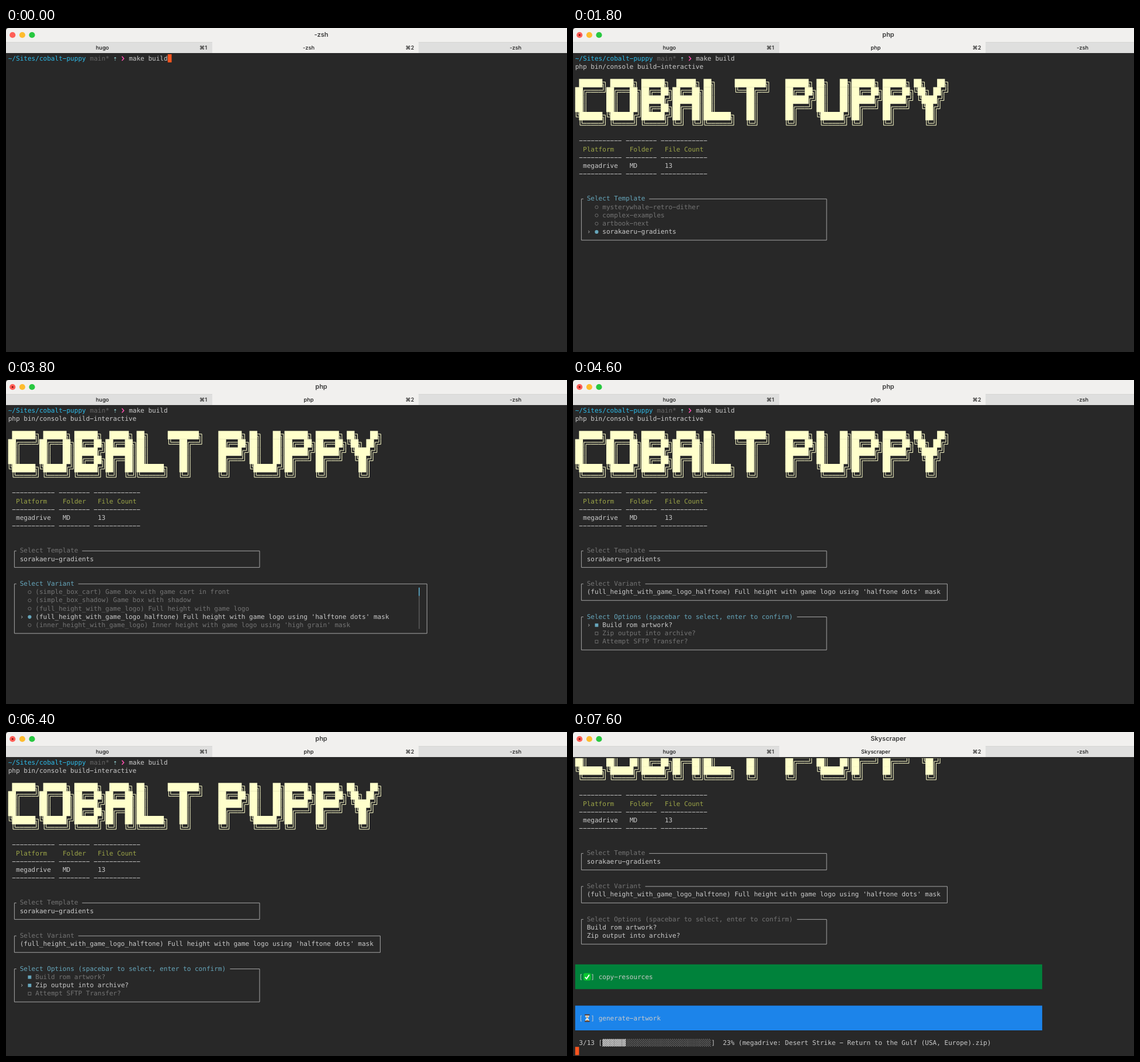
An HTML page for the animation above (8000 ms loop, 960 px wide and 556 px high).

```html
<!DOCTYPE html>
<html lang="en">
<head>
<meta charset="utf-8">
<title>Terminal session</title>
<style>
  html, body { margin: 0; width: 100%; height: 100%; overflow: hidden; background: #282828; }
  svg { display: block; width: 100%; height: 100%; }
  text { white-space: pre; text-rendering: geometricPrecision; }
  .mono { font: 11.062px "DejaVu Sans Mono", "DejaVu Sans", monospace; }
  .title { font: 600 11px Inter, sans-serif; fill: #3c3c3c; text-anchor: middle; }
  .tab { font: 500 9.2px Inter, "DejaVu Sans", sans-serif; fill: #161616; text-anchor: middle; }
</style>
</head>
<body>
<svg viewBox="0 0 960 556" xmlns="http://www.w3.org/2000/svg">
  <rect width="960" height="556" fill="#282828"/>
  <g id="screen"></g>
  <g id="chrome"></g>
</svg>
<script>
const LOOP = 8000, STEP = 200;
const CELL_W = 6.66, CELL_H = 14.155, LEFT = 3.7, TOP = 44.9;
const INK = '#c9c9c9', DIM = '#747474', LINE = '#a6a6a6', ACCENT = '#66a6bb',
      OLIVE = '#9ca548', CREAM = '#ffffcb', CURSOR = '#f9551f';

const TEMPLATES = ['mysterywhale-retro-dither', 'complex-examples', 'artbook-next', 'sorakaeru-gradients'];
const VARIANTS = [
  '(simple_box_cart) Game box with game cart in front',
  '(simple_box_shadow) Game box with shadow',
  '(full_height_with_game_logo) Full height with game logo',
  "(full_height_with_game_logo_halftone) Full height with game logo using 'halftone dots' mask",
  "(inner_height_with_game_logo) Inner height with game logo using 'high grain' mask"
];
const OPTIONS = ['Build rom artwork?', 'Zip output into archive?', 'Attempt SFTP Transfer?'];
const OPTIONS_TITLE = 'Select Options (spacebar to select, enter to confirm)';

const GLYPHS = {
  C: ' ██████╗/██╔════╝/██║     /██║     /╚██████╗/ ╚═════╝',
  O: ' ██████╗ /██╔═══██╗/██║   ██║/██║   ██║/╚██████╔╝/ ╚═════╝ ',
  B: '██████╗ /██╔══██╗/██████╔╝/██╔══██╗/██████╔╝/╚═════╝ ',
  A: ' █████╗ /██╔══██╗/███████║/██╔══██║/██║  ██║/╚═╝  ╚═╝',
  L: '██╗     /██║     /██║     /██║     /███████╗/╚══════╝',
  T: '████████╗/╚══██╔══╝/   ██║   /   ██║   /   ██║   /   ╚═╝   ',
  P: '██████╗ /██╔══██╗/██████╔╝/██╔═══╝ /██║     /╚═╝     ',
  U: '██╗   ██╗/██║   ██║/██║   ██║/██║   ██║/╚██████╔╝/ ╚═════╝ ',
  Y: '██╗   ██╗/╚██╗ ██╔╝/ ╚████╔╝ /  ╚██╔╝  /   ██║   /   ╚═╝   ',
  ' ': '    /    /    /    /    /    '
};
// Arm directions of the double-line corners: horizontal, vertical
const CORNERS = { '╔': [1, 1], '╗': [-1, 1], '╚': [1, -1], '╝': [-1, -1] };

const colX = col => LEFT + col * CELL_W;
const rowY = row => TOP + row * CELL_H;
const midX = col => colX(col + .5) + .7;
const midY = row => rowY(row + .5) + .7;

const rect = (x, y, w, h, fill, extra = '') =>
  `<rect x="${x}" y="${y}" width="${w}" height="${h}" fill="${fill}" ${extra}/>`;
const stroke = (d, color = LINE, width = 1) =>
  `<path d="${d}" fill="none" stroke="${color}" stroke-width="${width}"/>`;
const circle = (x, y, r, fill, extra = '') =>
  `<circle cx="${x}" cy="${y}" r="${r}" fill="${fill}" ${extra}/>`;
const label = (cls, x, y, str) => `<text class="${cls}" x="${x}" y="${y}">${str}</text>`;
// The wide minus gives the long hyphens of the terminal font
const text = (col, row, str, fill = INK) =>
  `<text class="mono" x="${colX(col)}" y="${rowY(row) + 10.9}" fill="${fill}">${str.replace(/-/g, '−')}</text>`;
const cursor = (col, row) => rect(colX(col), rowY(row), CELL_W, CELL_H, CURSOR);

function banner(word, firstRow) {
  const gap = 1.7;
  let lines = '', blocks = '';
  for (let r = 0; r < 6; r++) {
    const row = firstRow + r, y0 = rowY(row), y1 = rowY(row + 1), cy = (y0 + y1) / 2;
    const chars = [...word].map(ch => GLYPHS[ch].split('/')[r]).join('');
    for (const run of chars.matchAll(/█+/g))
      blocks += rect(colX(run.index), y0, run[0].length * CELL_W, CELL_H + .3, CREAM);
    [...chars].forEach((ch, col) => {
      const x0 = colX(col), x1 = colX(col + 1), cx = (x0 + x1) / 2;
      for (const d of [-gap, gap]) {
        if (ch === '═') lines += `M${x0} ${cy + d}H${x1}`;
        if (ch === '║') lines += `M${cx + d} ${y0}V${y1}`;
        if (CORNERS[ch]) {
          const [sx, sy] = CORNERS[ch];
          lines += `M${sx > 0 ? x1 : x0} ${cy + sy * d}H${cx + sx * d}V${sy > 0 ? y1 : y0}`;
        }
      }
    });
  }
  return stroke(lines, CREAM) + blocks;
}
const BANNER = banner('COBALT PUPPY', 3);

function table(row) {
  const rule = '----------- -------- ------------';
  const cells = (r, names, fill) => names.map((name, i) => text([2, 14, 23][i], r, name, fill)).join('');
  return [0, 2, 4].map(r => text(1, row + r, rule)).join('') +
    cells(row + 1, ['Platform', 'Folder', 'File Count'], OLIVE) +
    cells(row + 3, ['megadrive', 'MD', '13'], INK);
}

function box(row, title, innerRows, lastCol, active) {
  const x0 = midX(1), x1 = midX(lastCol), y0 = midY(row), y1 = midY(row + innerRows + 1);
  return text(3, row, title, active ? ACCENT : DIM) +
    stroke(`M${colX(2) + .7} ${y0}H${x0}V${y1}H${x1}V${y0}H${colX(title.length + 4)}`);
}

function answered(row, title, values, lastCol) {
  return box(row, title, values.length, lastCol, false) +
    values.map((value, i) => text(3, row + 1 + i, value)).join('');
}

function radio(row, on) {
  return on ? circle(midX(5) - .6, midY(row), 3.1, ACCENT)
            : circle(midX(5) - .6, midY(row), 2.6, 'none', `stroke="${DIM}" stroke-width=".9"`);
}

function checkbox(row, on) {
  const x = midX(5) - 3.5, y = midY(row) - 2.9;
  return on ? rect(x, y, 5.8, 5.8, ACCENT)
            : rect(x + .5, y + .5, 4.8, 4.8, 'none', `stroke="${DIM}" stroke-width=".9"`);
}

function menu(row, title, items, lastCol, focus, mark) {
  return box(row, title, items.length, lastCol, true) + items.map((item, i) => {
    const r = row + 1 + i, focused = i === focus;
    return (focused ? text(3, r, '›', LINE) : '') + mark(r, i) + text(7, r, item, focused ? INK : DIM);
  }).join('');
}

function task(row, name, color, icon) {
  return rect(colX(0), rowY(row), 120 * CELL_W, 3 * CELL_H, color) +
    text(1, row + 1, '[') + text(4, row + 1, '] ' + name) +
    `<g transform="translate(${colX(2) + 1} ${rowY(row + 1) + .9})">${icon}</g>`;
}
const CHECK_ICON = rect(0, 0, 12.6, 12.6, '#0ac630', 'rx="2.6"') +
  stroke('M2.7 6.8L5.2 9.7L9.8 2.8', '#fff', 1.9);
const GLASS_ICON =
  '<path d="M2.8 1.5H9.8Q9.8 5 7 6.5Q9.8 8 9.8 11.5H2.8Q2.8 8 5.6 6.5Q2.8 5 2.8 1.5Z" fill="#dbe6ee"/>' +
  '<path d="M4 4H8.6L6.3 6.5ZM3.6 11.2Q6.3 7.5 9 11.2Z" fill="#c08a3c"/>' +
  rect(1.8, 0, 9, 2, '#5b3a29', 'rx=".8"') + rect(1.8, 11, 9, 2, '#5b3a29', 'rx=".8"');

function progress(row, done, file) {
  const filled = Math.floor(done / 13 * 28);
  const percent = String(Math.round(done / 13 * 100)).padStart(3);
  return text(1, row, `${done}/13 [${'▓'.repeat(filled)}${'░'.repeat(28 - filled)}] ${percent}% (${file})`);
}

// How many of the given moments have passed
const passed = (t, ...times) => times.filter(time => t >= time).length;

function screen(t) {
  let out = text(0, 0, '~/Sites/cobalt-puppy', '#2dbbe9') + text(21, 0, 'main*', '#666') +
    text(27, 0, '⇡', '#a5eef0') + stroke('M198.4 48.7L201.6 52.4L198.4 56.1', '#fb4fae', 1.6) +
    text(31, 0, 'make build');
  if (t < 200) return out + cursor(41, 0);
  out += text(0, 1, 'php bin/console build-interactive');
  if (t < 600) return out + cursor(0, 2);

  out += BANNER + table(10);
  if (t < 2200) {
    const focus = passed(t, 1000, 1200, 1400);
    return out + menu(17, 'Select Template', TEMPLATES, 64, focus, (r, i) => radio(r, i === focus));
  }
  out += answered(17, 'Select Template', [TEMPLATES[3]], 64);
  if (t < 4000) {
    const focus = passed(t, 2800, 3000, 3200);
    const x = midX(105);
    return out + menu(21, 'Select Variant', VARIANTS, 107, focus, (r, i) => radio(r, i === focus)) +
      stroke(`M${x} ${rowY(23)}V${rowY(27)}`, DIM) +
      stroke(`M${x} ${rowY(22)}V${rowY(23)}`, '#5fb2d2', 1.6);
  }
  out += answered(21, 'Select Variant', [VARIANTS[3]], 95);
  if (t < 6800) {
    const checked = passed(t, 4400, 6400);
    return out + menu(25, OPTIONS_TITLE, OPTIONS, 64, passed(t, 6000), (r, i) => checkbox(r, i < checked));
  }
  out += answered(25, OPTIONS_TITLE, OPTIONS.slice(0, 2), 64);

  const done = passed(t, 7200, 7400, 7600);
  const file = done ? 'megadrive: Desert Strike - Return to the Gulf (USA, Europe).zip' : '';
  out += task(31, 'copy-resources', '#00823b', CHECK_ICON) +
    task(36, 'generate-artwork', '#1c84ea', GLASS_ICON) +
    progress(40, done, file) + cursor(0, 41);
  return `<g transform="translate(0 ${-6 * CELL_H})">${out}</g>`;
}

function chrome(t) {
  const title = t < 200 ? '-zsh' : t < 6800 ? 'php' : t < 7000 ? 'sh' : 'Skyscraper';
  return rect(0, 0, 960, 43, '#f1f0ee') +
    rect(0, 24, 353, 19, '#dfdfde') + rect(706, 24, 254, 19, '#dfdfde') +
    rect(0, 24, 353, .6, '#d0d0cf') + rect(706, 24, 254, .6, '#d0d0cf') +
    rect(0, 43, 960, TOP - 43, '#282828') +
    '<path d="M0 0H5Q0 0 0 5Z" fill="#222"/>' +
    circle(11.2, 12, 5.1, '#ff5f57') + circle(27.9, 12, 5.1, '#febc2e') + circle(44.5, 12, 5.1, '#28c840') +
    (t >= 200 ? circle(11.2, 12, 1.6, '#7d0f0a') : '') +
    label('title', 539.5, 15.4, title) +
    label('tab', 165, 36.8, 'hugo') + label('tab', 337.5, 36.8, '⌘1') +
    label('tab', 518, 36.8, title) + label('tab', 691, 36.8, '⌘2') +
    label('tab', 872, 36.8, '-zsh');
}

const screenLayer = document.getElementById('screen');
const chromeLayer = document.getElementById('chrome');
const start = performance.now();
let shown = -1;

function frame() {
  const step = Math.floor((performance.now() - start) % LOOP / STEP);
  if (step !== shown) {
    shown = step;
    screenLayer.innerHTML = screen(step * STEP);
    chromeLayer.innerHTML = chrome(step * STEP);
  }
  requestAnimationFrame(frame);
}
frame();
</script>
</body>
</html>
```
